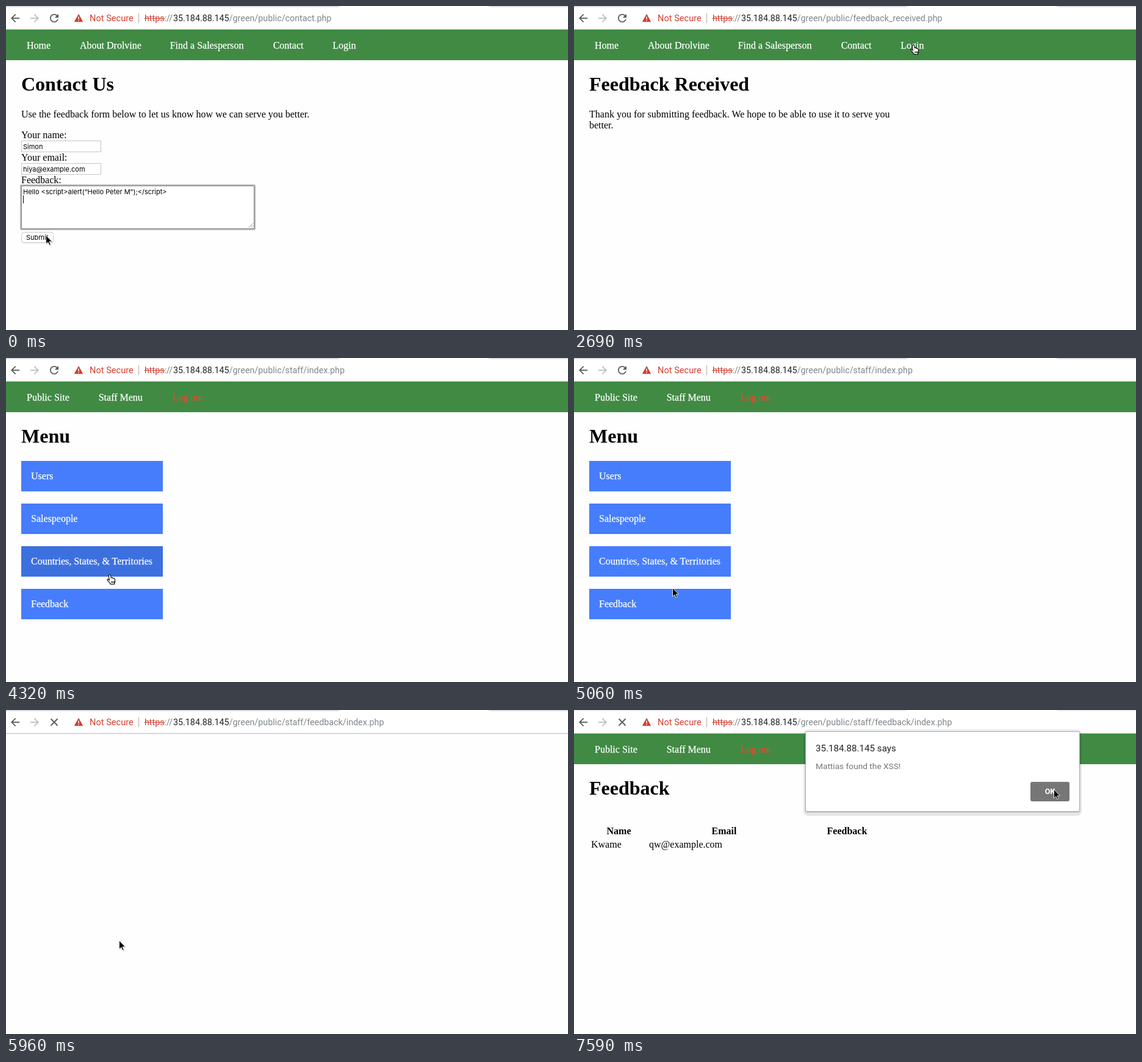
An HTML page that plays this animation: 921 by 532 pixels, repeating every 8000 ms.

```html
<!DOCTYPE html>
<html lang="en">
<head>
<meta charset="utf-8">
<title>Contact form</title>
<style>
  html, body { margin: 0; width: 100%; height: 100%; overflow: hidden; background: #fefefe; }
  svg { display: block; width: 921px; height: 532px; }
  text { white-space: pre; }
  .page { font: 16px "Liberation Serif", "Times New Roman", serif; }
  .page h1, .title { font-size: 32px; font-weight: bold; }
  .head { font-weight: bold; }
  .nav text, .item text { fill: #fff; stroke: #fff; stroke-width: .25; }
  .nav .logout { fill: #f2492c; stroke: none; }
  .nav rect { fill: #408a44; }
  .item rect { fill: #467dfd; }
  .item.hover rect { fill: #3d70df; }
  .field { font: 11px Inter, sans-serif; }
  .box { fill: #fff; stroke: #c6c6c6; }
  .bar { font: 14.3px Roboto, sans-serif; }
  .red { fill: #d23f31; }
  .soft { fill: #80868b; }
  .dialog { font: 13.7px Roboto, sans-serif; }
</style>
</head>
<body>
<svg viewBox="0 0 921 532">
  <rect width="921" height="532" fill="#fefefe"/>

  <g class="nav page" id="publicNav">
    <rect y="39" width="921" height="50"/>
    <text x="34" y="70">Home</text>
    <text x="121" y="70">About Drolvine</text>
    <text x="268.7" y="70">Find a Salesperson</text>
    <text x="437.7" y="70">Contact</text>
    <text x="535.3" y="70">Login</text>
  </g>
  <g class="nav page" id="staffNav">
    <rect y="39" width="921" height="50"/>
    <text x="34" y="70">Public Site</text>
    <text x="151.7" y="70">Staff Menu</text>
    <text x="272.7" y="70" class="logout">Log out</text>
  </g>

  <g class="page" id="contact">
    <text class="title" x="25" y="139">Contact Us</text>
    <text x="25" y="183">Use the feedback form below to let us know how we can serve you better.</text>
    <text x="25" y="217">Your name:</text>
    <text x="25" y="254">Your email:</text>
    <text x="25" y="291">Feedback:</text>
    <g class="field">
      <rect class="box" x="25.5" y="221.5" width="130" height="18"/>
      <text x="28" y="235">Simon</text>
      <rect class="box" x="25.5" y="258.5" width="130" height="18"/>
      <text x="28" y="272">hiya@example.com</text>
      <rect id="ring" x="24.5" y="294.5" width="383" height="72" rx="1.5" fill="none" stroke="#b5b5b5" stroke-width="3"/>
      <rect class="box" id="area" x="25.5" y="295.5" width="381" height="70"/>
      <path d="M398 363.500l7-7M402 363.500l3-3" stroke="#888" fill="none"/>
      <text x="28" y="309">Hello &lt;script&gt;alert(“Hello Peter M”);&lt;/script&gt;</text>
      <path id="caret" d="M28.500 311v13" stroke="#000"/>
      <rect x="25.500" y="372" width="52" height="17.500" rx="4" fill="#d5d5d5"/>
      <rect x="25.500" y="371.500" width="52" height="17" rx="4" fill="#fff" stroke="#c8c8c8"/>
      <text x="33" y="384">Submit</text>
    </g>
  </g>

  <g class="page" id="received">
    <text class="title" x="25" y="139">Feedback Received</text>
    <text x="25" y="183">Thank you for submitting feedback. We hope to be able to use it to serve you</text>
    <text x="25" y="201">better.</text>
  </g>

  <g class="page" id="menu">
    <text class="title" x="25" y="139">Menu</text>
  </g>

  <g class="page" id="feedback">
    <text class="title" x="25" y="139">Feedback</text>
    <g class="head">
      <text x="53.500" y="204">Name</text>
      <text x="225.500" y="204">Email</text>
      <text x="414.500" y="204">Feedback</text>
    </g>
    <text x="28" y="226">Kwame</text>
    <text x="123" y="226">qw@example.com</text>
  </g>

  <g class="bar">
    <rect width="921" height="38" fill="#fff"/>
    <path id="tabs" d="M0 0H547Q546 2 542 2H0ZM790 0H921V2H796Q792 2 790 0Z"/>
    <path d="M0 38.500H921" stroke="#b4b4b4"/>
    <path id="back" fill="#5a5a5a" transform="translate(4.500 9.500) scale(.875)"
      d="M20 11H7.830l5.590-5.590L12 4l-8 8 8 8 1.410-1.410L7.830 13H20z"/>
    <use href="#back" transform="translate(62 0) scale(-1 1)" opacity="0"/>
    <path fill="#bdbdbd" transform="translate(57.500 9.500) scale(-.875 .875)"
      d="M20 11H7.830l5.590-5.590L12 4l-8 8 8 8 1.410-1.410L7.830 13H20z"/>
    <path id="reload" fill="#5a5a5a" transform="translate(68.500 9.500) scale(.875)"
      d="M17.650 6.350C16.200 4.900 14.210 4 12 4c-4.420 0-8 3.580-8 8s3.580 8 8 8c3.730 0 6.840-2.550 7.730-6h-2.080c-.820 2.330-3.040 4-5.650 4-3.310 0-6-2.690-6-6s2.690-6 6-6c1.660 0 3.140.690 4.220 1.780L13 11h7V4z"/>
    <path id="stop" d="M73.500 14.500l11 11m0-11l-11 11" stroke="#5a5a5a" stroke-width="1.800"/>
    <path class="red" d="M119 13l7.300 13H111.700z"/>
    <path d="M119 17.500v4M119 22.700v1.600" stroke="#fff" stroke-width="1.500"/>
    <text class="red" x="137" y="25" font-size="14.600">Not Secure</text>
    <path d="M217.500 12v16" stroke="#b9a5a3"/>
    <text class="red" x="227" y="25">https</text>
    <path d="M226.500 20.500h34" stroke="#d23f31" stroke-width="1.200"/>
    <text class="soft" x="259.500" y="25">://</text>
    <text x="274" y="25" fill="#222">35.184.88.145<tspan class="soft" id="path"></tspan></text>
  </g>

  <g class="dialog" id="dialog">
    <rect x="376" y="32" width="456" height="142" rx="8" fill="#000" opacity=".09"/>
    <rect x="378.500" y="35" width="451" height="134" rx="4" fill="#000" opacity=".12"/>
    <rect x="379.500" y="35.500" width="449" height="131" rx="2" fill="#fff" stroke="#aaa"/>
    <text x="396" y="68" font-size="15.150" fill="#222">35.184.88.145 says</text>
    <text x="396" y="97" fill="#757575" id="message"></text>
    <rect id="ok" x="748" y="118" width="64" height="32" rx="3"/>
    <text x="780" y="138" text-anchor="middle" font-size="12.500" font-weight="bold" fill="#fff">OK</text>
  </g>

  <g id="cursor">
    <g id="arrow">
      <path d="M.5 1V15.500L4 12.300 6.300 17.500 8.800 16.400 6.500 11.300H11z" fill="#000" opacity=".2" transform="translate(.5 1)"/>
      <path d="M.5.500V14.800L3.800 11.800 6 16.800 8.200 15.800 6 10.900H10.500z" fill="#000" stroke="#fff" stroke-width=".9"/>
    </g>
    <path id="hand" transform="translate(-5 -1)" fill="#fff" stroke="#000" stroke-width="1.100"
      d="M4.200 1c1-.6 2 0 2.200 1l.9 4 .3-.3c.8-.5 1.700 0 1.900.7.700-.5 1.600-.1 1.900.7.900-.5 1.900.1 2 1.200l.2 3.200c0 1.500-1 2.500-1.200 5H6.500C5.500 14 2.500 12 1 9.500c-.5-1 .8-1.900 2-1l1.300 1.200L3.300 2.500C3.200 1.800 3.600 1.300 4.200 1zM8 11.500v3M10 11.500v3M12 11.500v3"/>
  </g>
</svg>
<script>
const LOOP = 8000, TICK = 148.9;
const $ = id => document.getElementById(id);
const show = (id, on) => { $(id).style.display = on ? '' : 'none'; };

const items = ['Users', 'Salespeople', 'Countries, States, & Territories', 'Feedback'].map((label, i) => {
  const y = 169 + 70 * i;
  const group = document.createElementNS('http://www.w3.org/2000/svg', 'g');
  group.setAttribute('class', 'item');
  group.innerHTML = `<rect x="25" y="${y}" width="232" height="50"/><text x="41" y="${y + 30}">${label.replace('&', '&amp;')}</text>`;
  $('menu').append(group);
  return { group, y };
});

// Each page runs until its end tick.
const pages = [
  { id: 'contact', end: 11, path: 'contact.php' },
  { id: 'received', end: 22, path: 'feedback_received.php' },
  { id: 'menu', end: 40, path: 'staff/index.php' },
  { id: 'blank', end: 50, path: 'staff/feedback/index.php' },
  { id: 'feedback', end: Infinity, path: 'staff/feedback/index.php' }
];

// Pointer hotspot: tick, x, y
const moves = [
  [0, 65, 376], [2, 49, 379], [13, 49, 379], [18, 556, 64], [21, 556, 64],
  [23, 369, 191], [24, 369, 191], [29, 170, 356], [32, 165, 361],
  [36, 157, 393], [39, 157, 393], [45, 532, 193], [47, 786, 130], [99, 786, 130]
];

function pointerAt(tick) {
  const i = moves.findIndex(m => m[0] > tick);
  const [t0, x0, y0] = moves[i - 1], [t1, x1, y1] = moves[i];
  const u = (tick - t0) / (t1 - t0), ease = u * u * (3 - 2 * u);
  return [x0 + (x1 - x0) * ease, y0 + (y1 - y0) * ease];
}

function draw(ms) {
  const tick = Math.floor((ms % LOOP + 8) / TICK);
  const page = pages.find(p => tick < p.end);
  const [x, y] = pointerAt(tick);

  for (const { id } of pages) if (id !== 'blank') show(id, id === page.id);
  show('publicNav', page.id === 'contact' || page.id === 'received');
  show('staffNav', page.id === 'menu' || page.id === 'feedback');
  $('path').textContent = '/green/public/' + page.path;

  const loading = tick >= 6 && tick < 12 || tick >= 20 && tick < 23 || tick >= 37;
  show('stop', loading);
  show('reload', !loading);

  show('caret', tick < 1);
  show('ring', tick < 5);
  $('area').style.stroke = tick < 5 ? '#8a8a8a' : '';

  show('dialog', tick >= 41 && tick < 48 || tick >= 50);
  $('message').textContent = tick < 50 ? 'XSS' : 'Mattias found the XSS!';
  $('ok').setAttribute('fill', tick < 47 ? '#808080' : '#767676');
  $('tabs').setAttribute('fill', tick < 41 ? '#dcdde0' : '#ececec');

  let link = page.id === 'received' && y < 80;
  for (const item of items) {
    const over = page.id === 'menu' && x >= 25 && x < 257 && y >= item.y && y < item.y + 50;
    item.group.classList.toggle('hover', over);
    link = link || over;
  }
  show('hand', link);
  show('arrow', !link);
  $('cursor').setAttribute('transform', `translate(${Math.round(x)} ${Math.round(y)})`);
}

function frame() {
  draw(performance.now());
  requestAnimationFrame(frame);
}
frame();
</script>
</body>
</html>
```
